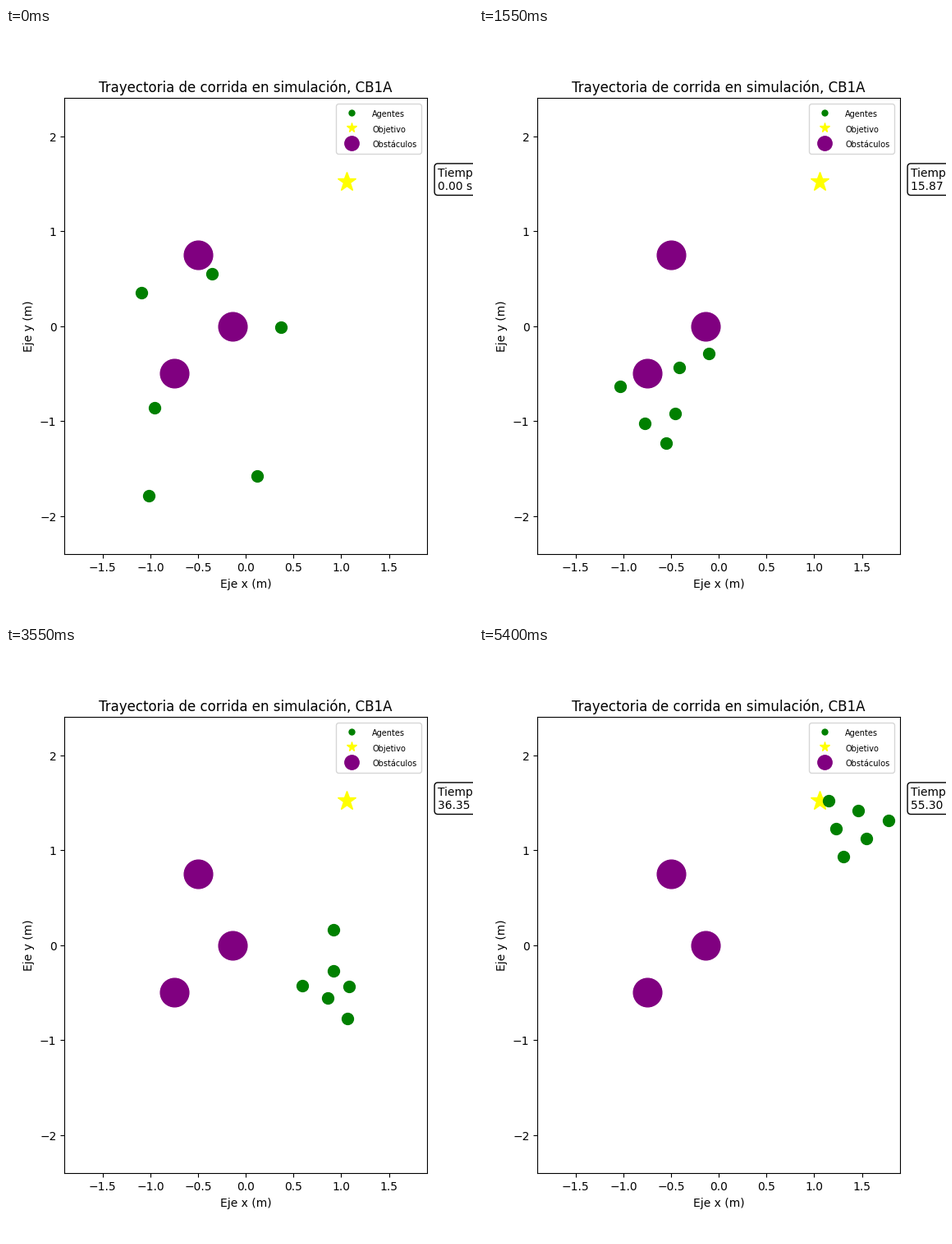
A matplotlib script that plays this animation: 569x719 px, repeating every 5.45 s.

```python
import numpy as np
import matplotlib.pyplot as plt
from matplotlib.animation import FuncAnimation

W, H, DPI = 569, 719, 100
FRAMES, INTERVAL = 109, 50
STEP = 0.512  # simulated seconds per frame

# Axes rectangle in pixels
LEFT, BOTTOM, AX_W, AX_H = 71.25, 79.2, 441.75, 554.4

# Agent positions in metres, written as x + yj
START = [0.37 - 0.01j, -0.35 + 0.55j, -0.96 - 0.86j,
         -1.09 + 0.35j, -1.02 - 1.79j, 0.12 - 1.58j]
GATHER = [0.19 - 0.29j, -0.27 + 0.28j, -0.53 - 0.83j,
          -1.24 - 0.28j, -0.92 - 1.26j, -0.52 - 1.35j]
GROUP = [-0.21 - 0.29j, -0.47 - 0.70j, -0.43 - 0.95j,
         -0.96 - 0.77j, -0.72 - 0.94j, -0.56 - 1.19j]
APPROACH = [1.29 + 1.31j, 1.49 + 0.87j, 1.76 + 0.77j,
            1.30 + 0.64j, 1.59 + 0.54j, 1.84 + 0.35j]
# The run ends in a triangle of rows, leader first
FINAL = [1.31 + 0.93j + col * (0.235 + 0.19j) + row * (-0.08 + 0.295j)
         for row in (2, 1, 0) for col in range(3 - row)]

DETOUR = 0.31 - 0.44j  # sideways swing around the obstacles


def ease_in(s):
    return s * s


def ease_out(s):
    return s * (2 - s)


def linear(s):
    return s


# First frame, last frame, from, to, easing, swing
LEGS = [(0, 19, START, GATHER, ease_in, 0),
        (19, 44, GATHER, GROUP, ease_out, 0),
        (44, 93, GROUP, APPROACH, linear, DETOUR),
        (93, 108, APPROACH, FINAL, linear, 0)]


def positions(k):
    first, last, a, b, ease, swing = next(leg for leg in LEGS if k <= leg[1])
    s = (k - first) / (last - first)
    a, b = np.array(a), np.array(b)
    return a + (b - a) * ease(s) + swing * np.sin(np.pi * s)


plt.rcParams["font.family"] = "DejaVu Sans"
# The part-pixel of extra height only settles text rounding
fig_w, fig_h = W + 0.01, H + 0.49
fig = plt.figure(figsize=(fig_w / DPI, fig_h / DPI), dpi=DPI)
ax = fig.add_axes([LEFT / fig_w, BOTTOM / fig_h, AX_W / fig_w, AX_H / fig_h])
ax.set(xlim=(-1.9, 1.9), ylim=(-2.4, 2.4),
       xlabel="Eje x (m)", ylabel="Eje y (m)")
ax.set_title("Trayectoria de corrida en simulación, CB1A", pad=5.65)
ax.tick_params(axis="x", pad=3.85)

agents, = ax.plot([], [], "o", color="green", ms=10, zorder=2.1,
                  label="Agentes")
ax.plot([1.06], [1.52], "*", color="yellow", ms=17, label="Objetivo")
ax.plot([-0.5, -0.135, -0.75], [0.75, 0, -0.5], "o", color="purple", ms=25,
        label="Obstáculos")

legend = ax.legend(loc="upper right", markerscale=0.5, fontsize=10)
plt.setp(legend.get_texts(), fontsize=7)

clock = ax.text(1.03, 0.8, "", transform=ax.transAxes, fontsize=10,
                bbox=dict(boxstyle="round,pad=0.3", fc="white", ec="black"))


def update(k):
    p = positions(k)
    agents.set_data(p.real, p.imag)
    clock.set_text(f"Tiempo:\n{STEP * k:.2f} s")
    return agents, clock


anim = FuncAnimation(fig, update, frames=FRAMES, interval=INTERVAL,
                     repeat=True, repeat_delay=0)
plt.show()
```
